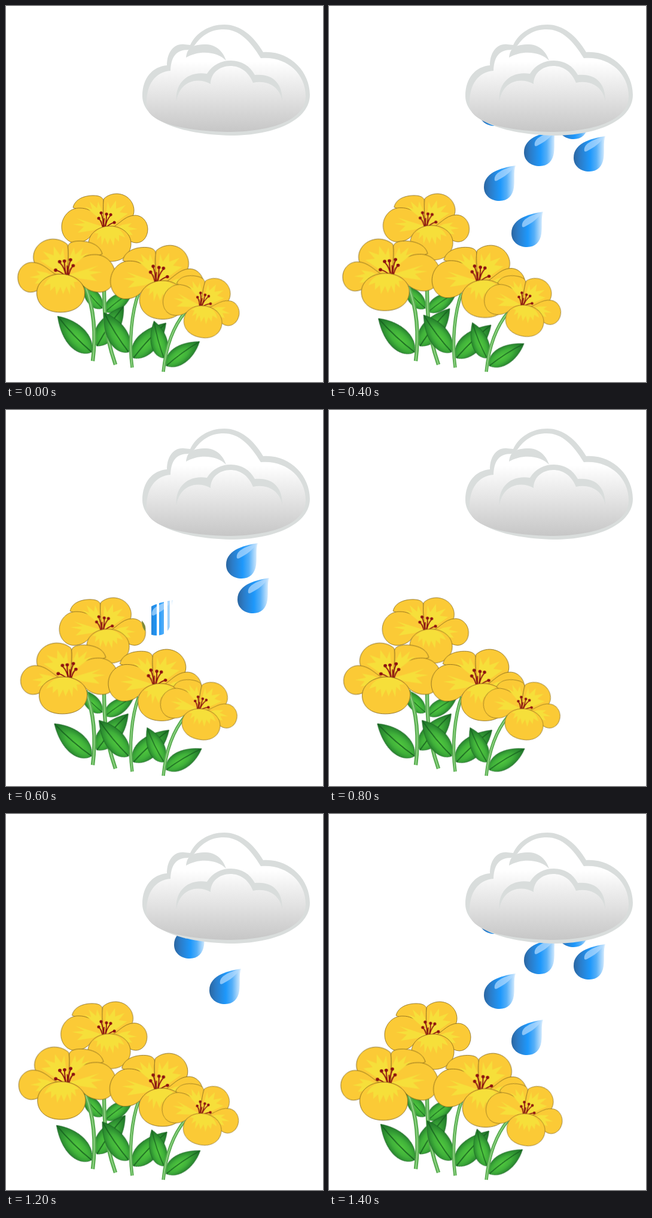
These frames come from a looping animation (530 px wide and 627 px high, 1500 ms). An HTML page without scripts:

```html
<!DOCTYPE html>
<html lang="en">
<head>
<meta charset="utf-8">
<title>Flowers in the rain</title>
<style>
html, body { margin: 0; width: 100%; height: 100%; overflow: hidden; background: #fff; }
svg { display: block; width: 530px; height: 627px; }

/* Plants lean one way for 700 ms and come back in 700 ms */
.bloom, .stamens, .leaf { animation: sway 1.5s steps(7, end) infinite; }
.stamens { animation-name: settle; }
.leaf { animation-name: turn; }
@keyframes sway {
  0%, 93.33%, 100% { transform: none; }
  46.66% { transform: translateX(var(--dx)) skewX(var(--skew)) scaleY(.963); }
}
@keyframes settle {
  0%, 93.33%, 100% { transform: none; }
  46.66% { transform: translate(2.4px, 2.7px); }
}
@keyframes turn {
  0%, 93.33%, 100% { transform: translate(var(--at)) rotate(var(--a)) scale(var(--s)); }
  46.66% { transform: translate(var(--at)) rotate(var(--b)) scale(var(--s)); }
}
.right { --dx: 7.5px; --skew: -1.8deg; }
.left { --dx: -6.5px; --skew: 2.2deg; }

/* The shower repeats after one second and is cut off at the loop end */
.drop, .trace { opacity: 0; animation: 1.5s step-end infinite; }
.a { animation-name: a; }
.b { animation-name: b; }
.c { animation-name: c; }
.d { animation-name: d; }
.e { animation-name: e; }
.f { animation-name: f; }
.trace { animation-name: trace; }
@keyframes a {
  0%, 46.66%, 100% { opacity: 0; clip-path: none; }
  13.33%, 80% { opacity: 1; transform: translate(307px, 216px); }
  20%, 86.66% { transform: translate(296px, 258px); }
  26.66%, 93.33% { transform: translate(285px, 300px); }
  33.33% { transform: translate(269px, 326px); }
  40% { transform: translate(252px, 351px); clip-path: url(#strips); }
}
@keyframes b {
  0%, 33.33%, 100% { opacity: 0; }
  6.66%, 73.33% { opacity: 1; transform: translate(384px, 249px); }
  13.33%, 80% { transform: translate(366px, 292px); }
  20%, 86.66% { transform: translate(348px, 335px); }
  26.66%, 93.33% { transform: translate(331px, 377px); }
}
@keyframes c {
  0%, 40%, 100% { opacity: 0; }
  20%, 86.66% { opacity: 1; transform: translate(363px, 205px); }
  26.66%, 93.33% { transform: translate(352px, 242px); }
  33.33% { transform: translate(340px, 278px); }
}
@keyframes d {
  0%, 53.33%, 100% { opacity: 0; }
  20%, 86.66% { opacity: 1; transform: translate(446px, 219px); }
  26.66%, 93.33% { transform: translate(435px, 251px); }
  33.33% { transform: translate(424px, 283px); }
  40% { transform: translate(413px, 314px); }
  46.66% { opacity: .5; transform: translate(402px, 345px); }
}
@keyframes e {
  0%, 53.33%, 100% { opacity: 0; }
  26.66%, 93.33% { opacity: 1; transform: translate(409px, 197px); }
  33.33% { transform: translate(401px, 227px); }
  40% { transform: translate(394px, 256px); }
  46.66% { opacity: .5; transform: translate(386px, 286px); }
}
@keyframes f {
  0%, 33.33%, 100% { opacity: 0; }
  26.66%, 93.33% { opacity: 1; transform: translate(277px, 175px); }
}
@keyframes trace {
  0%, 46.66%, 100% { opacity: 0; }
  40% { opacity: 1; }
}
</style>
</head>
<body>
<svg viewBox="0 0 530 627">
  <defs>
    <linearGradient id="sky" gradientUnits="userSpaceOnUse" x1="0" y1="92" x2="0" y2="210">
      <stop stop-color="#fff"/><stop offset="1" stop-color="#c6c6c6"/>
    </linearGradient>
    <linearGradient id="water">
      <stop stop-color="#2b66a0"/><stop offset=".2" stop-color="#2b7cc8"/>
      <stop offset=".52" stop-color="#1e98fb"/><stop offset=".72" stop-color="#55aff8"/>
      <stop offset="1" stop-color="#e4f2fe"/>
    </linearGradient>
    <radialGradient id="green" cx=".5" cy=".62" r=".55">
      <stop stop-color="#50c83e"/><stop offset=".5" stop-color="#40b13a"/>
      <stop offset="1" stop-color="#217a2b"/>
    </radialGradient>
    <clipPath id="strips">
      <path d="M-9-40h9v80h-9zM4-40h8v80h-8zM18-40h4v80h-4zM25-40h2v80h-2z"/>
    </clipPath>

    <g id="drop">
      <path fill="url(#water)" d="M27-34C10-31-26-25-26 2C-26 17-13 25 0 25C14 25 22 16 24 3C26-10 23-24 27-34Z"/>
      <path fill="#b4dcff" opacity=".7" d="M-8-9C-10-20 2-27 25-33C18-22 8-15-2-10Q-6-7-8-9Z"/>
    </g>

    <g id="leaf">
      <path fill="url(#green)" stroke="#17601f" stroke-width=".8" d="M0 0C-18-5-30-37 0-80C23-48 20-12 0 0Z"/>
      <path fill="none" stroke="#17601f" stroke-width="1.6" d="M0 0Q-4-40 0-79"/>
    </g>

    <g id="flower">
      <g fill="#fbca36" stroke="#80641c" stroke-width=".8">
        <path d="M-2-2C-20-18-45-28-54-32C-50-48-32-52-20-52C-10-52-3-49-3-42C-4-30-3-18-2-2Z"/>
        <path d="M-2 0C-4-25-4-42-2-47C6-54 14-55 20-55C38-54 48-40 48-27C48-10 30 2 12 4Z"/>
        <path d="M4 4C20 2 30-19 50-19C62-19 71-8 71 4C71 18 62 27 52 27C40 27 28 14 10 6Z"/>
        <path d="M-2 0C-6-14-22-31-42-31C-60-32-73-16-73 0C-73 16-62 27-50 27C-38 27-29 22-22 13C-14 6-6 4 0 2Z"/>
      </g>
      <path fill="#f6df3a" d="M-4 0L-48-14L-34-6L-54-4L-36 0L-46 10L-20 6Z
        M-4-8L-34-34L-22-29L-26-42L-14-31L-12-42L-5-26Z
        M-1-4L4-42L8-30L18-44L18-30L34-36L24-24L38-22L10-2Z
        M14 5L28-3L44-6L38 0L54 4L40 6L46 14L28 12Z"/>
      <g class="stamens" fill="none" stroke="#8c1210" stroke-width="1.7">
        <path d="M-4 2Q-6-8-11-14M-3 2Q-3-12-7-22M-1 2Q2-10 2-20M0 2Q1-10 9-19M1 2Q7-5 15-7M-2 2Q-3-6-2-14"/>
        <path stroke-width="5" stroke-linecap="round" d="M-11-14h.1M-7-23h.1M2-21h.1M9-20h.1M15-7h.1"/>
      </g>
      <path fill="#fbca36" stroke="#80641c" stroke-width=".8"
        d="M8-1C-12-1-28 12-28 28C-28 46-14 58 8 58C30 58 43 45 43 28C43 12 28-1 8-1Z"/>
      <path fill="#f6df3a" d="M8 0C-4 0-12 4-18 11L-12 11L-14 22L-7 15L-6 31L-1 18L4 30L8 19L14 32L16 18L23 25L23 14L33 18C28 6 20 0 8 0Z"/>
    </g>

    <path id="backStems" d="M164 465C164 500 165 530 171 556Q176 578 183 598M133 468C147 505 151 545 145 592"/>
    <path id="frontStems" d="M222 478C210 510 205 560 211 603M300 510C279 535 267 570 263 610"/>
  </defs>

  <use class="leaf" href="#leaf" style="--at:161px,504px;--a:-40deg;--b:-46deg;--s:.68"/>
  <use class="leaf" href="#leaf" style="--at:166px,510px;--a:53deg;--b:57deg;--s:.72"/>
  <use class="leaf" href="#leaf" style="--at:152px,567px;--a:34deg;--b:42deg;--s:1"/>
  <g fill="none">
    <use href="#backStems" stroke="#58ac50" stroke-width="6.5"/>
    <use href="#backStems" stroke="#8fd383" stroke-width="2"/>
  </g>
  <use class="leaf" href="#leaf" style="--at:143px,577px;--a:-43.5deg;--b:-50deg;--s:1.03"/>
  <use class="leaf" href="#leaf" style="--at:205px,577px;--a:-32deg;--b:-41deg;--s:.97"/>
  <use class="leaf" href="#leaf" style="--at:213px,587px;--a:43deg;--b:49deg;--s:1"/>
  <use class="leaf" href="#leaf" style="--at:264px,587px;--a:-15deg;--b:-28deg;--s:.8"/>
  <use class="leaf" href="#leaf" style="--at:268px,600px;--a:54deg;--b:60deg;--s:.86"/>
  <g fill="none">
    <use href="#frontStems" stroke="#58ac50" stroke-width="5.5"/>
    <use href="#frontStems" stroke="#8fd383" stroke-width="1.8"/>
  </g>

  <g class="bloom left" style="transform-origin:166px 313px">
    <use href="#flower" transform="translate(166 368)"/>
  </g>
  <g class="bloom right" style="transform-origin:101px 388px">
    <use href="#flower" transform="translate(100 448) scale(-1.13 1.08)"/>
  </g>
  <g class="bloom left" style="transform-origin:252px 399px">
    <use href="#flower" transform="translate(253.5 459) scale(1.08 1.09)"/>
  </g>
  <g class="bloom left" style="transform-origin:325px 450px">
    <use href="#flower" transform="translate(327.5 500) rotate(11) scale(.9)"/>
  </g>
  <path class="trace" fill="#7f8a3a" d="M227 351Q235 359 233 369Q227 363 227 351Z"/>

  <use class="drop a" href="#drop"/>
  <use class="drop b" href="#drop"/>
  <use class="drop c" href="#drop"/>
  <use class="drop d" href="#drop"/>
  <use class="drop e" href="#drop"/>
  <use class="drop f" href="#drop"/>

  <g fill="#d9dddc">
    <path d="M228 150C228 120 245 101 269 99C269 78 280 62 298 64L308 65C318 44 340 31 365 31C392 31 414 50 430 77C475 74 508 110 508 148C508 190 450 216 375 216C290 214 228 190 228 150Z"/>
    <path fill="url(#sky)" d="M235 165C234 130 250 110 275 108C276 85 284 73 305 73L315 66C327 49 342 39 364 39C390 39 408 58 426 87C468 83 501 112 501 150C501 192 440 210 370 210C300 208 236 196 235 165Z"/>
    <path d="M301 86C303 70 310 64 335 64C352 65 363 76 368 91C355 77 325 72 301 86Z"/>
    <path d="M285 160C282 130 302 108 336 113C345 98 360 91 376 91C394 91 408 100 416 115C445 112 463 128 462 160C460 138 440 122 413 128C405 108 390 100 375 100C357 100 342 112 342 130C315 116 288 130 285 160Z"/>
  </g>
</svg>
</body>
</html>
```
